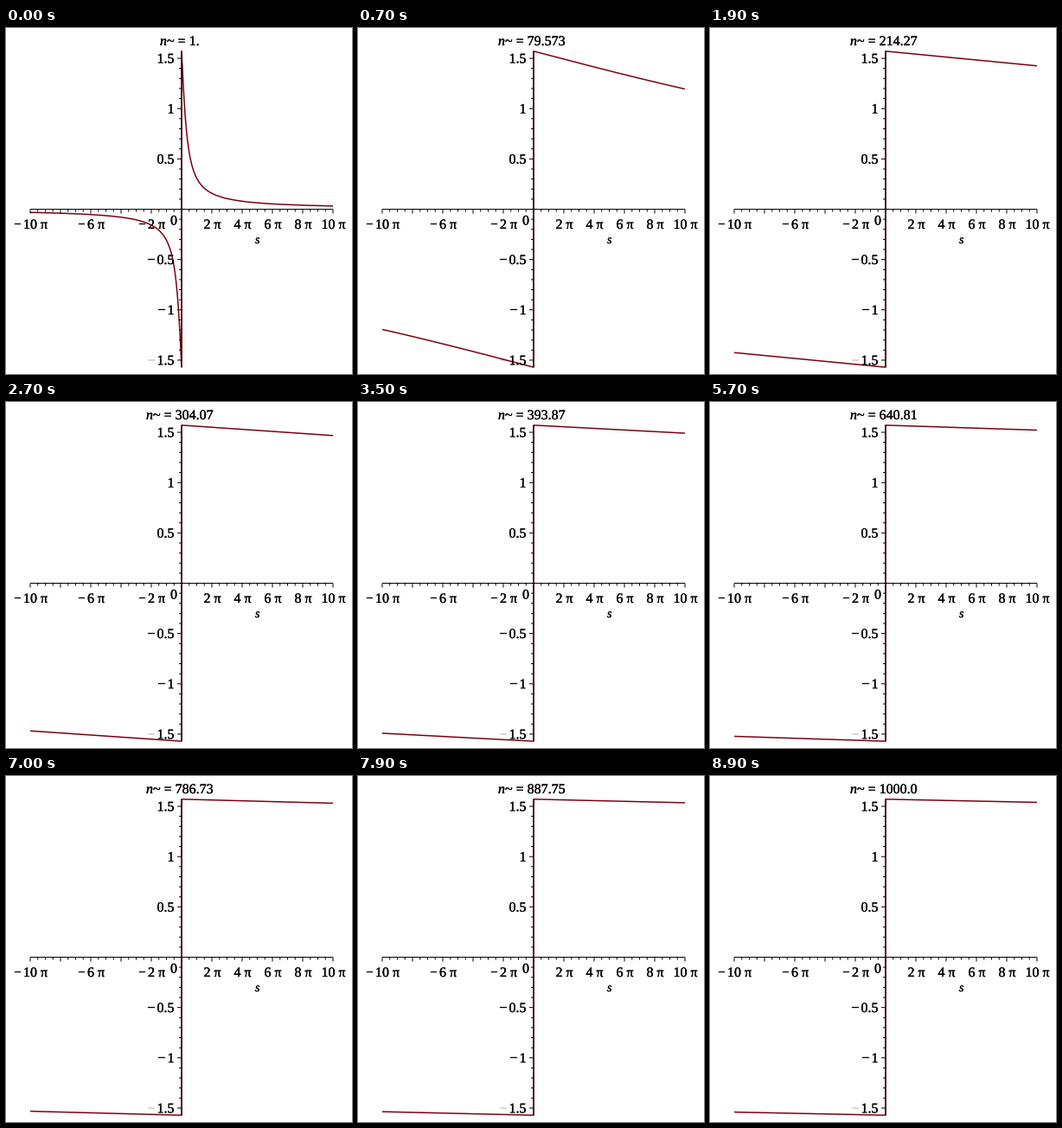
Recreate the animation shown at these times as a matplotlib script. Size 400x400 px, loop 9 s.

```python
import numpy as np
import matplotlib.pyplot as plt
from matplotlib.animation import FuncAnimation
from matplotlib.patheffects import withStroke

SIZE, DPI = 400, 100
FRAMES, INTERVAL = 90, 100
PX = 72 / DPI
FONT = 16
X0, Y0 = 203, 209.5        # origin on the stage
X_UNIT = 17.5 / np.pi      # pixels per unit of s
Y_UNIT = 116.3             # pixels per unit of arctan
CURVE = "#78000e"
MINUS = "\u2212"
MINUS_STEP = 11
ADVANCE = {".": 4, " ": 4, "~": 8.66, "=": 9}

plt.rcParams["font.family"] = "Liberation Serif"
plt.rcParams["text.hinting"] = "none"

fig = plt.figure(figsize=(SIZE / DPI, SIZE / DPI), dpi=DPI, facecolor="white")
ax = fig.add_axes([0, 0, 1, 1])
ax.set(xlim=(0, SIZE), ylim=(SIZE, 0))
ax.axis("off")
ink = [withStroke(linewidth=0.3 * PX, foreground="black")]


def width(s):
    return sum(ADVANCE.get(c, 8) for c in s)


def text(x, y, s, size=FONT, **kw):
    return ax.text(x, y, s, fontsize=size * PX, va="baseline", zorder=4,
                   path_effects=ink, **kw)


def number(left, y, s, negative):
    if negative:
        text(left, y, MINUS)
        left += MINUS_STEP
    text(left, y, s)


def rule(x, y):
    ax.plot(x, y, color="black", lw=PX, zorder=3,
            solid_capstyle="butt", snap=False)


def draw_axes():
    rule([28, 378], [Y0, Y0])
    rule([X0, X0], [27, 392])
    for i in range(-20, 21):
        x = X0 + 8.75 * i
        rule([x, x], [Y0, Y0 + (5 if i % 4 == 0 else 3)])
    for i in range(-15, 16):
        y = Y0 - Y_UNIT * i / 10
        rule([X0 - (5 if i % 5 == 0 else 3), X0], [y, y])


def draw_labels():
    for k in (-10, -6, -2, 2, 4, 6, 8, 10):
        s = f"{abs(k)} \u03c0"
        w = width(s) + (MINUS_STEP if k < 0 else 0)
        number(X0 + 17.5 * k - w / 2 + 0.5, 232, s, k < 0)
    for v in (-1.5, -1, -0.5, 0.5, 1, 1.5):
        s = f"{abs(v):g}"
        w = width(s) + (MINUS_STEP if v < 0 else 0)
        number(194.5 - w, Y0 - Y_UNIT * v + 5.3, s, v < 0)
    text(190, 227.5, "0")
    text(288, 249, "s", size=14, style="italic")


draw_axes()
draw_labels()

half = np.concatenate([[1e-9], np.geomspace(1e-3, 10 * np.pi, 300)])
s_values = np.concatenate([-half[::-1], half])
curve, = ax.plot([], [], color=CURVE, lw=1.5 * PX, zorder=2, snap=False,
                 solid_capstyle="butt", solid_joinstyle="round")
name = text(0, 20, "n", style="italic")
value = text(0, 20, "")


def readout(k, n):
    return "1." if k == 0 else f"{n:.{5 - len(str(int(n + 1e-9)))}f}"


def update(k):
    n = 1 + 999 * k / (FRAMES - 1)
    curve.set_data(X0 + X_UNIT * s_values,
                   Y0 - Y_UNIT * np.arctan(n / s_values))
    tail = "~ = " + readout(k, n)
    left = 200.8 - width("n" + tail) / 2
    name.set_x(left)
    value.set_x(left + width("n"))
    value.set_text(tail)
    return curve, name, value


anim = FuncAnimation(fig, update, frames=FRAMES, interval=INTERVAL,
                     repeat=True, repeat_delay=0)
plt.show()
```
